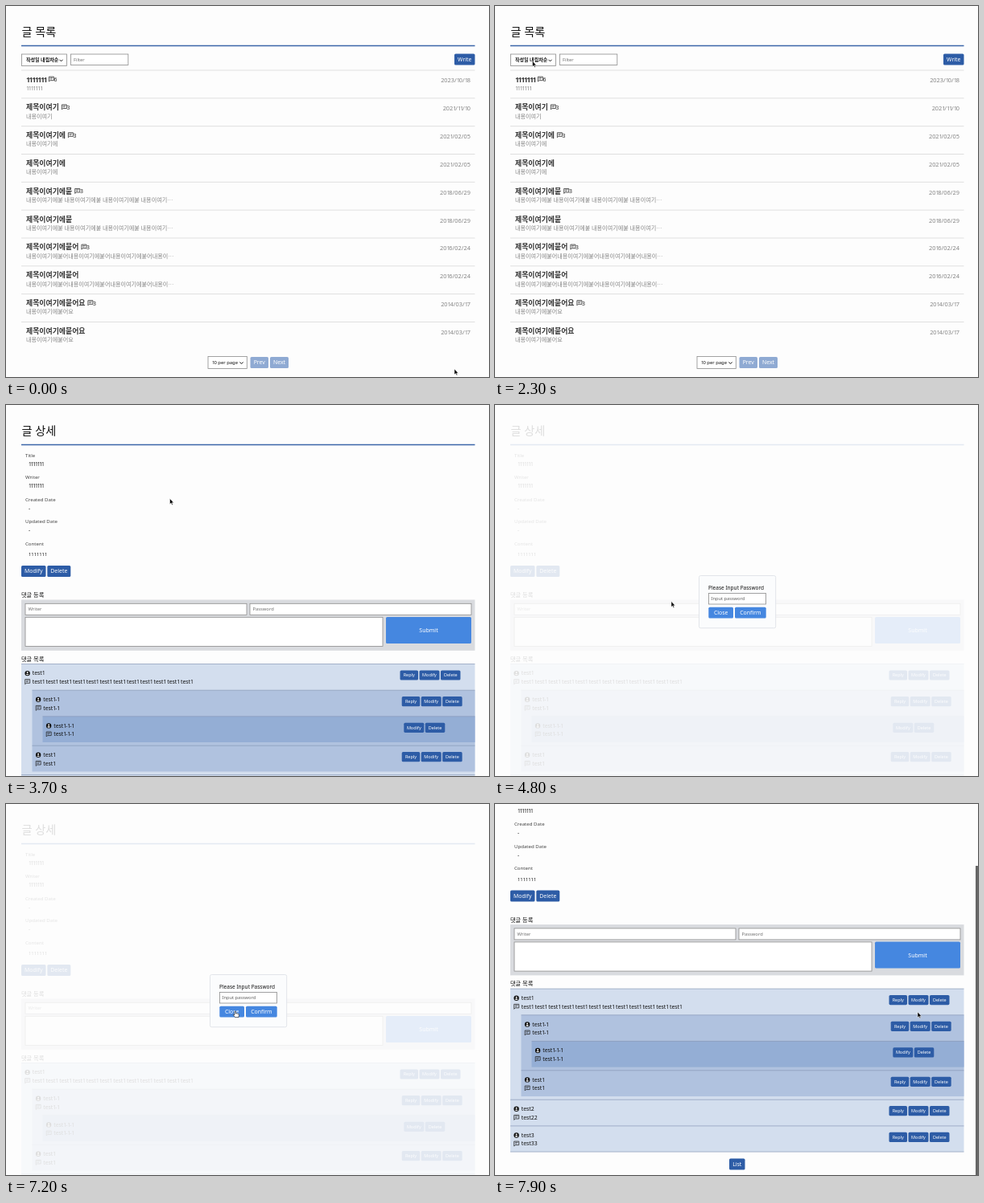
Animation of 600 by 462 pixels, one loop 8000 ms. Source, as an HTML page:

```html
<!DOCTYPE html>
<html lang="ko">
<head>
<meta charset="utf-8">
<title>Board</title>
<style>
  html, body { margin: 0; width: 100%; height: 100%; overflow: hidden; background: #fdfdfd; }
  svg { display: block; width: 100%; height: 100%; }
  text { font-family: 'Noto Sans', 'Noto Sans CJK KR', sans-serif; white-space: pre; }
  .one { letter-spacing: -.17em; }
  .row .bg { fill: none; }
  .row .sub, .row .date { fill: #858585; }
  .row.on .bg { fill: #ebedf1; }
  .row.on .sub, .row.on .date { fill: #181818; }
</style>
</head>
<body>
<svg viewBox="0 0 600 462">
  <defs>
    <g id="bubble" fill="none" stroke="#222" stroke-width=".75">
      <path d="M.4.4H6.4V5H1.8L.4 6.4Z"/>
      <path d="M1.6 1.8H5.2M1.6 3.3H4.2" stroke-width=".6"/>
    </g>
    <g id="person">
      <circle cx="3.2" cy="3.2" r="3.2" fill="#111"/>
      <circle cx="3.2" cy="2.2" r="1" fill="#fff"/>
      <path d="M1.3 4.7Q3.2 2.9 5.1 4.7Q3.2 6.2 1.3 4.7Z" fill="#fff"/>
    </g>
  </defs>
  <g id="list"></g>
  <g id="detail"></g>
  <g id="menu"></g>
  <g id="modal"></g>
  <rect id="thumb" x="597" width="3" fill="#666"/>
  <g id="cursor">
    <path id="arrow" d="M0 0V7L1.6 5.6L2.7 8L3.8 7.5L2.7 5.2H4.8Z" fill="#000" stroke="#fff" stroke-width=".5"/>
    <path id="hand" d="M-.8.5Q0-.5.8.5V3Q1.5 2.4 2.1 3.2Q2.9 2.7 3.4 3.5Q4.6 3 4.7 4.4L4.2 7.6H-.2L-2.6 4.5Q-2.3 3.4-.8 4.5Z" fill="#fff" stroke="#111" stroke-width=".6"/>
  </g>
</svg>
<script>
const $ = id => document.getElementById(id);
const BLUE = '#2d5ca6', BRIGHT = '#4587e0', PALE = '#8faad3';

// y is the optical middle of the line
function text(x, y, str, size, fill = '#111', { weight = 400, anchor = 'start', cls = '' } = {}) {
  const body = str.replace(/1/g, '<tspan class="one">1</tspan>');
  return `<text x="${x}" y="${y + size * .36}" font-size="${size}" fill="${fill}" font-weight="${weight}" text-anchor="${anchor}" class="${cls}">${body}</text>`;
}
const box = (x, y, x2, y2, fill, extra = '') =>
  `<rect x="${x}" y="${y}" width="${x2 - x}" height="${y2 - y}" fill="${fill}" ${extra}/>`;
const field = (x, y, x2, y2) => box(x, y, x2, y2, '#fff', 'stroke="#8c8c8c" stroke-width=".8"');
const line = (x, y, color = '#d9d9d9', w = .8) =>
  `<path d="M${x} ${y}H582.5" stroke="${color}" stroke-width="${w}"/>`;
const use = (id, x, y) => `<use href="#${id}" x="${x}" y="${y}"/>`;
const chevron = (x, y) => `<path d="M${x - 2} ${y - 1}l2 2l2-2" fill="none" stroke="#111"/>`;
const button = (x, x2, y, h, label, size = 6.9, fill = BLUE) =>
  box(x, y - h / 2, x2, y + h / 2, fill, 'rx="1.6"') +
  text((x + x2) / 2, y, label, size, '#fff', { anchor: 'middle' });
const header = title => text(19.5, 31.5, title, 14.2, '#111') + line(19, 49.5, '#3b65a9', 1.4);

const ROW_TOP = 80, ROW_H = 34.83;

function buildList() {
  const long = '내용이여기에붙 '.repeat(3) + '내용이여기⋯';
  const longer = '내용이여기에붙어'.repeat(3) + '내용이⋯';
  const rows = [
    ['1111111', '1111111', '2023/10/18', 53, 6],
    ['제목이여기', '내용이여기', '2021/11/10', 69, 3],
    ['제목이여기에', '내용이여기에', '2021/02/05', 77, 3],
    ['제목이여기에', '내용이여기에', '2021/02/05'],
    ['제목이여기에붙', long, '2018/06/29', 85.3, 3],
    ['제목이여기에붙', long, '2018/06/29'],
    ['제목이여기에붙어', longer, '2016/02/24', 93.5, 3],
    ['제목이여기에붙어', longer, '2016/02/24'],
    ['제목이여기에붙어요', '내용이여기에붙어요', '2014/03/17', 101.5, 3],
    ['제목이여기에붙어요', '내용이여기에붙어요', '2014/03/17']
  ];
  let s = header('글 목록') +
    field(19.5, 60, 75.5, 74.5) + text(25, 67.3, '작성일 내림차순', 6, '#111', { weight: 700 }) + chevron(68.5, 67.8) +
    field(80.5, 60, 151.8, 73.5) + text(84, 67, 'Filter', 5.8, '#707070') +
    button(557, 582.5, 66.5, 14, 'Write');
  rows.forEach(([title, sub, date, ix, count], i) => {
    const y = ROW_TOP + i * ROW_H;
    s += `<g class="row">` + box(19, y, 582.5, y + ROW_H, '', 'class="bg"') + line(19, y) +
      text(25, y + 11.3, title, 8.9, '#333', { weight: 700 }) +
      text(25, y + 22.2, sub, 7.1, '', { cls: 'sub' }) +
      text(577, y + 12.7, date, 7.4, '', { anchor: 'end', cls: 'date' });
    if (count) s += use('bubble', ix, y + 7.7) + text(ix + 6.6, y + 11.6, '' + count, 6.8, '#222', { weight: 500 });
    s += '</g>';
  });
  return s + field(251, 436.5, 299.3, 451.5) + text(256, 444, '10 per page', 5.9, '#111', { weight: 500 }) +
    chevron(292.5, 444.5) + button(303.5, 326, 444, 14, 'Prev', 6.9, PALE) + button(328, 351, 444, 14, 'Next', 6.9, PALE);
}

function comment(x, y, name, body, shift, reply = true) {
  const b = (from, to, label) => button(from + shift, to + shift, y + 14, 12.2, label, 5.5);
  return line(x, y, '#8798b6', .7) +
    use('person', x + 4.4, y + 8.4) + text(x + 13.7, y + 11.5, name, 6.9) +
    use('bubble', x + 4.3, y + 18.8) + text(x + 13.7, y + 22, body, 6.9) +
    (reply ? b(489.5, 512, 'Reply') : '') + b(513.5, 538.5, 'Modify') + b(540, 564.5, 'Delete');
}

function buildDetail() {
  let s = header('글 상세');
  ['Title', 'Writer', 'Created Date', 'Updated Date', 'Content'].forEach((label, i) => {
    const y = 62.5 + i * 27.5;
    s += text(24, y, label, 6.1, '#444');
    if (i < 4) s += text(28, y + 10.8, i < 2 ? '1111111' : '-', 6.6);
  });
  s += `<text x="28" y="188.2" font-size="5.8" fill="#111">1111111</text>`;
  const heading = { weight: 500 };
  return s + button(19, 49.5, 207, 14, 'Modify') + button(51.3, 80.3, 207, 14, 'Delete') +
    text(19, 236.7, '댓글 등록', 7.2, '#111', heading) +
    box(19, 242.5, 582.5, 305.8, '#d9dbdf') +
    field(24, 247.3, 299, 261.3) + text(27.5, 254.3, 'Writer', 5.8, '#707070') +
    field(303, 247.3, 578, 261.3) + text(306.5, 254.3, 'Password', 5.8, '#707070') +
    field(24, 264.3, 468, 300.5) + button(472, 578, 280.5, 33, 'Submit', 7, BRIGHT) +
    text(19, 316.3, '댓글 목록', 7.2, '#111', heading) +
    box(19, 322.5, 582.5, 525.5, '#d3deee') +
    box(32.5, 355.2, 582.5, 456.5, '#b0c2df') +
    box(45.5, 387.8, 582.5, 420, '#94aed5') +
    comment(19, 322.5, 'test1', Array(12).fill('test1').join(' '), 0) +
    comment(32.5, 355.2, 'test1-1', 'test1-1', 2.2) +
    comment(45.5, 387.8, 'test1-1-1', 'test1-1-1', -19.2, false) +
    comment(32.5, 424.2, 'test1', 'test1', 2.2) +
    comment(19, 460.6, 'test2', 'test22', 0) +
    comment(19, 493.3, 'test3', 'test33', 0) +
    line(19, 525.5, '#8798b6', .7) +
    button(291, 310.5, 541, 14, 'List');
}

function buildMenu() {
  const items = ['제목 오름차순', '제목 내림차순', '작성일 오름차순', '작성일 내림차순'];
  return box(19, 29, 77.2, 75.7, '#5b5553', 'rx="3" style="filter:drop-shadow(0 1px 2px #0006)"') +
    '<rect id="pick" x="21.5" width="53" height="10.4" rx="1.5" fill="#8c8785"/>' +
    items.map((s, i) => text(30, 36.6 + i * 10.45, s, 5.9, '#fff')).join('') +
    '<path d="M24 68.5l1.3 1.7l2.5-4" fill="none" stroke="#fff" stroke-width=".9"/>';
}

function buildModal() {
  return box(0, 0, 600, 462, '#fdfdfd', 'opacity=".87"') +
    box(253.5, 212.5, 348.7, 277.8, '#fbfcfd', 'stroke="#dfe3e8" stroke-width=".9" rx="2"') +
    text(265, 227.6, 'Please Input Password', 6.5, '#111', { weight: 500 }) +
    field(265.5, 234.5, 336.5, 248) + text(268.5, 241.3, 'Input password', 5.7, '#606060') +
    button(265.3, 296, 258.6, 13.8, 'Close', 6.9, BRIGHT) + button(298, 336.7, 258.6, 13.8, 'Confirm', 6.9, BRIGHT);
}

$('list').innerHTML = buildList();
$('detail').innerHTML = buildDetail();
$('menu').innerHTML = buildMenu();
$('modal').innerHTML = buildModal();
const rows = document.querySelectorAll('.row');

// pointer stops: time, x, y
const path = [
  [0, 557, 452], [100, 557, 452], [700, 48, 67], [1100, 48, 67], [1600, 49, 50], [2000, 47, 67],
  [2600, 46, 70], [2800, 42, 84], [3100, 38, 94.5], [3300, 38, 94.5], [3700, 203.5, 116.5],
  [4100, 36, 206], [4400, 36, 206], [5000, 283, 258], [5500, 283, 258], [5900, 307, 403.5],
  [6300, 506, 401], [6600, 506, 401], [7100, 284.8, 258], [7300, 284.8, 258], [7700, 525, 259], [8000, 525, 259]
];
const PAGE = 554.4, VIEW = 462, LOOP = 8000;
const within = (t, ...spans) => spans.some(([a, b]) => t >= a && t < b);
const ease = p => p * p * (3 - 2 * p);
const clamp = v => Math.min(1, Math.max(0, v));
const show = (id, on) => $(id).style.display = on ? '' : 'none';

function pointer(t) {
  const i = path.findIndex(k => k[0] > t), [t0, x0, y0] = path[i - 1], [t1, x1, y1] = path[i];
  const p = ease((t - t0) / (t1 - t0));
  return [x0 + (x1 - x0) * p, y0 + (y1 - y0) * p];
}

function draw(t) {
  const [x, y] = pointer(t);
  const inList = t < 3400, menuOpen = within(t, [900, 2100]);
  const hover = inList && !menuOpen && x > 19 && x < 582 ? Math.floor((y - ROW_TOP) / ROW_H) : -1;
  rows.forEach((r, i) => r.classList.toggle('on', i === hover));
  show('list', inList);
  show('detail', !inList);
  show('menu', menuOpen);
  show('modal', within(t, [4300, 5500], [6500, 7300]));
  $('pick').setAttribute('y', 31.4 + 10.45 * Math.min(3, Math.max(0, Math.floor((y - 31.4) / 10.45))));

  const scroll = (PAGE - VIEW) * ease(clamp((t - 7400) / 400));
  $('detail').setAttribute('transform', `translate(0 ${-scroll})`);
  show('thumb', scroll > 0);
  $('thumb').setAttribute('y', scroll * VIEW / PAGE);
  $('thumb').setAttribute('height', VIEW * VIEW / PAGE);

  const hand = hover >= 0 && hover < 10 ||
    within(t, [4000, 4300], [4900, 5500], [6300, 6500], [7000, 7300]);
  show('hand', hand);
  show('arrow', !hand);
  $('cursor').setAttribute('transform', `translate(${x} ${y})`);
}

const start = performance.now();
function tick() {
  const t = (performance.now() - start) % LOOP;
  draw(Math.floor(t / 100) * 100);
  requestAnimationFrame(tick);
}
tick();
</script>
</body>
</html>
```
